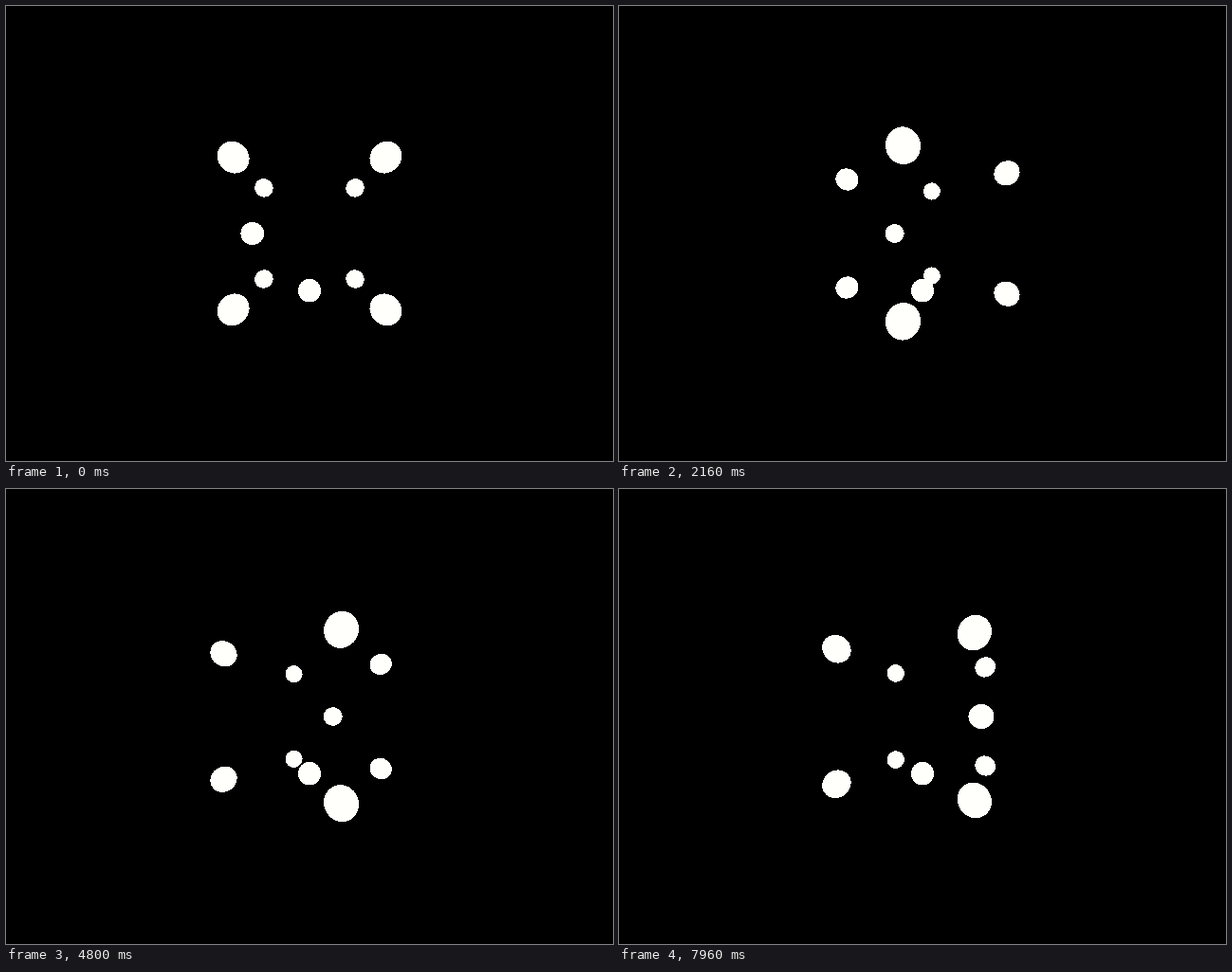
Animation of 640 by 480 pixels, one loop 8000 ms. Source, as an HTML page without scripts:

```html
<!DOCTYPE html>
<html lang="en">
<head>
<meta charset="utf-8">
<title>Turning balls</title>
<style>
@property --turn { syntax: "<angle>"; inherits: true; initial-value: 0deg; }

html, body { margin: 0; width: 100%; height: 100%; overflow: hidden; background: #000; }
svg { display: block; width: 100%; height: 100%; }

/* one degree every 40 ms */
#scene { animation: turn 8s steps(200) -1ms infinite; }
@keyframes turn { from { --turn: 0deg; } to { --turn: 200deg; } }

/* Balls of radius 0.2 seen from distance 4 with focal length 240.
   --d: distance from the axis, --p: start angle, --y: height.
   A sphere off the view axis projects to a slightly stretched ellipse. */
circle {
  fill: #fffffb;
  --d: 1.41421;
  --p: 0deg;
  --y: 1;
  --x: calc(var(--d) * sin(var(--p) - var(--turn)));
  --z: calc(4 - var(--d) * cos(var(--p) - var(--turn)));
  --q: calc(var(--z) * var(--z) - 0.04);
  --k: calc(240px * var(--z) / var(--q));
  --long: calc(48 * sqrt(var(--x) * var(--x) + var(--y) * var(--y) + var(--q)) / var(--q));
  --short: calc(48 / sqrt(var(--q)));
  transform:
    translate(calc(var(--k) * var(--x)), calc(var(--k) * var(--y)))
    rotate(atan2(var(--y), var(--x)))
    scale(var(--long), var(--short));
}
.top { --y: -1; }
.b1 { --p: 45deg; }
.b2 { --p: 135deg; }
.b3 { --p: 225deg; }
.b4 { --p: 315deg; }
.side { --d: 1; --p: -90deg; --y: 0; }
.axis { --d: 0; }
</style>
</head>
<body>
<svg viewBox="0 0 640 480" shape-rendering="crispEdges">
  <g id="scene" transform="translate(320 240)">
    <circle r="1" class="top b1"/>
    <circle r="1" class="top b2"/>
    <circle r="1" class="top b3"/>
    <circle r="1" class="top b4"/>
    <circle r="1" class="b1"/>
    <circle r="1" class="b2"/>
    <circle r="1" class="b3"/>
    <circle r="1" class="b4"/>
    <circle r="1" class="side"/>
    <circle r="1" class="axis"/>
  </g>
</svg>
</body>
</html>
```
